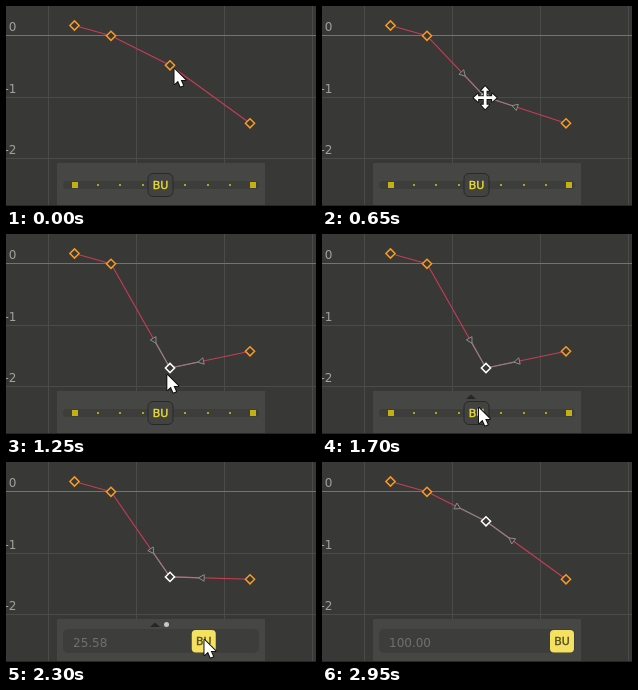
An HTML page with a canvas for the animation above (3.15 s loop, 310 by 200 pixels).

```html
<!DOCTYPE html>
<html lang="en">
<head>
<meta charset="utf-8">
<title>Curve editor slider</title>
<style>
html, body { margin: 0; width: 100%; height: 100%; overflow: hidden; background: #383836; }
canvas { display: block; }
</style>
</head>
<body>
<canvas id="stage" width="310" height="200"></canvas>
<script>
const g = document.getElementById('stage').getContext('2d');
const LOOP = 3150, STEP = 50;
const START = [68.5, 19.5], LEFT = [105, 29.8], RIGHT = [244, 117.3];
const HANDLE = 32.3, LOW = 134, HIGH = 59.3;
const FONT = '"DejaVu Sans", sans-serif';
const ARROW = new Path2D('M0 0V15L3.5 11.8 6 17.6 8.7 16.5 6.2 10.9H11Z');
const CROSS = new Path2D('M0-11.5L4-7H1.4V-1.4H7V-4L11.5 0 7 4V1.4H1.4V7H4L0 11.5-4 7H-1.4V1.4H-7V4L-11.5 0-7-4V-1.4H-1.4V-7H-4Z');

// Keyed paths: [time, x, y]
const APPROACH = [[0, 168.5, 63], [200, 164, 60]];
const DRAG = [[300, 164, 59.3], [450, 164.2, 67.3], [850, 161.5, 114.3], [900, 161.5, 114.3], [1050, 162, LOW]];
const TO_SLIDER = [[1150, 162, LOW], [1450, 160, 155], [1700, 157, 174]];

function follow(keys, t) {
  let i = 1;
  while (i < keys.length - 1 && t > keys[i][0]) i++;
  const [a, b] = [keys[i - 1], keys[i]];
  const k = Math.max(0, Math.min(1, (t - a[0]) / (b[0] - a[0])));
  return [a[1] + (b[1] - a[1]) * k, a[2] + (b[2] - a[2]) * k];
}

function rect(x, y, w, h, color) {
  g.fillStyle = color;
  g.fillRect(x, y, w, h);
}

function line(a, b, color) {
  g.strokeStyle = color;
  g.lineWidth = 1.1;
  g.beginPath();
  g.moveTo(...a);
  g.lineTo(...b);
  g.stroke();
}

function round(x, y, w, h, r, fill, stroke) {
  g.beginPath();
  g.roundRect(x, y, w, h, r);
  g.fillStyle = fill;
  g.fill();
  if (stroke) {
    g.strokeStyle = stroke;
    g.lineWidth = 1;
    g.stroke();
  }
}

function text(s, x, y, size, color, align = 'left') {
  g.font = size + 'px ' + FONT;
  g.textAlign = align;
  g.fillStyle = color;
  g.fillText(s, x, y);
}

// Regular polygon with one corner pointing along the angle
function polygon([x, y], sides, radius, angle, color, width) {
  g.beginPath();
  for (let i = 0; i < sides; i++) {
    const a = angle + i * 2 * Math.PI / sides;
    g.lineTo(x + radius * Math.cos(a), y + radius * Math.sin(a));
  }
  g.closePath();
  g.fillStyle = '#383836';
  g.fill();
  g.strokeStyle = color;
  g.lineWidth = width;
  g.stroke();
}

const diamond = (p, color) => polygon(p, 4, 4.6, 0, color, 1.5);

function pointer(shape, [x, y]) {
  g.save();
  g.translate(x, y);
  g.lineJoin = 'round';
  g.strokeStyle = '#111';
  g.lineWidth = 2;
  g.stroke(shape);
  g.fillStyle = '#fff';
  g.fill(shape);
  g.restore();
}

function grid() {
  rect(0, 0, 310, 200, '#383836');
  for (const x of [42, 130, 218, 306]) rect(x, 0, 1, 200, '#4b4b4a');
  for (const y of [91, 152]) rect(0, y, 310, 1, '#4b4b4a');
  rect(0, 29, 310, 1, '#737372');
  rect(0, 199, 310, 1, '#2b2428');
  ['0', '-1', '-2'].forEach((s, i) => text(s, 10.5, 25 + i * 61.5, 12, '#a0a0a0', 'right'));
}

function curve(p, selected) {
  line(START, LEFT, '#c83c54');
  const ends = [LEFT, RIGHT];
  for (const end of ends) line(end, p, '#c83c54');
  if (selected) {
    for (const end of ends) {
      const a = Math.atan2(end[1] - p[1], end[0] - p[0]);
      const h = [p[0] + HANDLE * Math.cos(a), p[1] + HANDLE * Math.sin(a)];
      line(h, p, '#858585');
      polygon(h, 3, 3.8, a + Math.PI, '#8c8c8c', 1);
    }
  }
  for (const q of [START, ...ends]) diamond(q, '#f59c28');
  diamond(p, selected ? '#fff' : '#f59c28');
}

function slider(t, u) {
  const dragging = t >= 1750, hover = t >= 1600 && t < 2950;
  rect(51, 157, 208, 42, '#464645');
  if (hover) {
    g.fillStyle = '#262626';
    g.fill(new Path2D('M144 165L149 160.5 154 165Z'));
  }
  if (dragging) {
    if (hover) round(158, 160, 5, 5, 2.5, '#c8c8c8');
    round(57, 167, 196, 24, 5, '#3d3d3c');
    text((100 * u * u).toFixed(2), 67, 185, 12, '#707070');
  } else {
    round(57, 175, 196, 8, 4, '#3d3d3c');
    for (const x of [66, 244]) rect(x, 176, 6, 6, '#c4b014');
    for (const x of [91, 113, 136, 178, 201, 223]) rect(x, 178, 2, 2, '#b0a31e');
  }
  const x = 154.5 + 85.5 * u;
  if (dragging) round(x - 12, 168, 24, 22.5, 4, '#f4e162');
  else round(x - 12.5, 167.5, 25, 23, 5, '#424241', '#292929');
  const color = dragging ? '#56501f' : '#e8dc38';
  text('BU', x, 183, 11, color, 'center');
  g.strokeStyle = color;
  g.lineWidth = 0.4;
  g.strokeText('BU', x, 183);
}

function draw(now) {
  const t = Math.floor(now % LOOP / STEP) * STEP;
  const travel = Math.max(0, t - 1700) * 0.000843;
  const u = Math.min(1, travel);
  const p = t < 350 ? [164, HIGH] : t < 1200 ? follow(DRAG, t) : [164, LOW + (HIGH - LOW) * u * u];
  grid();
  curve(p, t >= 350);
  slider(t, u);
  if (t < 350) pointer(ARROW, follow(APPROACH, t));
  else if (t < 1200) pointer(CROSS, [p[0] + 0.3, p[1] + 0.9]);
  else if (t <= 1700) pointer(ARROW, follow(TO_SLIDER, t));
  else if (t < 2950) pointer(ARROW, [156.5 + 83 * travel, 174 + Math.min(4, travel * 20)]);
}

const begin = performance.now();
function tick() {
  draw(performance.now() - begin);
  requestAnimationFrame(tick);
}
tick();
</script>
</body>
</html>
```
